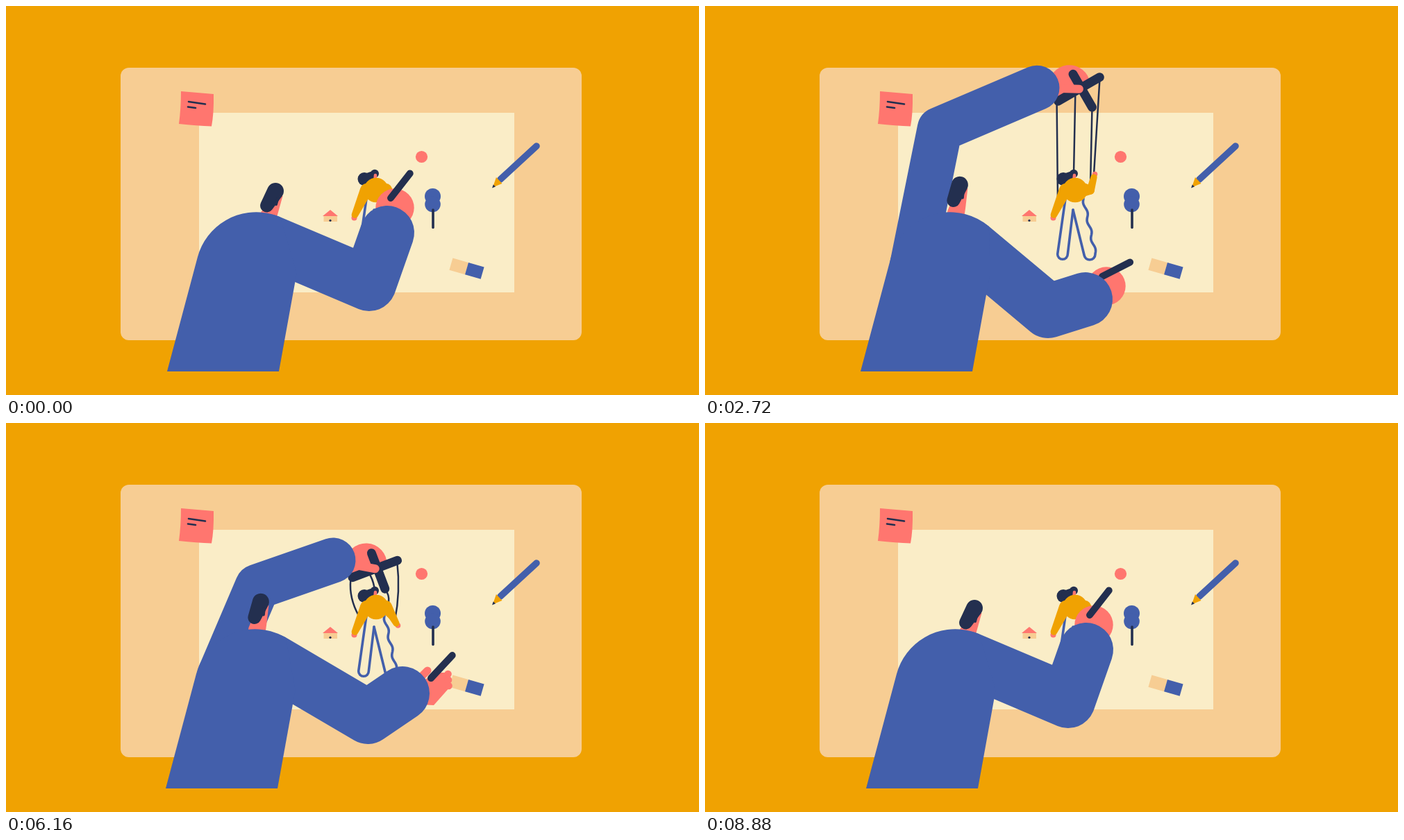
An HTML page with a canvas that plays this animation: 998x561 px, repeating every 8.96 s.

```html
<!DOCTYPE html>
<html lang="en">
<head>
<meta charset="utf-8">
<title>The illustrator</title>
<style>
  html, body { margin: 0; width: 100%; height: 100%; overflow: hidden; background: #f0a202; }
  canvas { display: block; width: 100vw; height: 100vh; }
</style>
</head>
<body>
<canvas id="stage"></canvas>
<script>
const W = 998, H = 561, LOOP = 8960, STEP = 80, TAU = Math.PI * 2;
const ORANGE = '#f0a202', SAND = '#f7cd93', PAPER = '#faedc7';
const BLUE = '#435fab', DARK = '#232f4f', PINK = '#ff766f';

const canvas = document.getElementById('stage');
const c = canvas.getContext('2d');

const clamp = u => Math.min(1, Math.max(0, u));
const mix = (a, b, k) => a + (b - a) * k;
const ramp = (t, from, to) => clamp((t - from) / (to - from));
const ease = (t, from, to) => { const u = ramp(t, from, to); return u * u * (3 - 2 * u); };
const rad = deg => deg * Math.PI / 180;

// Right arm: elbow, wrist, hand, pen angle, body lean.
const top_ = [523, 401, 549, 327, 560, 291, -52, 0];
const low = [511, 436, 541, 386, 553, 351, -62, 0];
const rest = [494, 440, 548, 423, 578, 404, -27, -8];
const reach = [521, 424, 571, 390, 618, 382, -47, -2];
const desk = [545, 418, 618, 390, 655, 378, -20, 0];
const rub = [529, 380, 553, 336, 565, 301, -52, 0];
const rightMoves = [
  [0, top_], [1040, low], [1240, low], [1640, top_], [2000, rest], [5640, rest],
  [6160, reach], [6480, desk], [6720, desk], [7040, low], [7600, rub], [7720, rub],
  [8000, desk], [8320, desk], [8880, top_]
];

// Left arm: elbow, wrist.
const hidden = [300, 400, 290, 450];
const aside = [228, 330, 300, 270];
const raisedUp = [338, 178, 478, 117];
const lowered = [362, 236, 471, 198];
const leftMoves = [
  [1960, hidden], [2120, aside], [2440, raisedUp], [5760, raisedUp], [6160, lowered], [6560, hidden]
];

function pose(moves, t) {
  const next = moves.findIndex(([time]) => time > t);
  if (next < 0) return moves[moves.length - 1][1];
  if (next === 0) return moves[0][1];
  const [t0, from] = moves[next - 1], [t1, to] = moves[next], k = ease(t, t0, t1);
  return from.map((v, i) => mix(v, to[i], k));
}

function fill(color) { c.fillStyle = color; c.fill(); }
function disc(x, y, r, color) {
  c.beginPath();
  c.arc(x, y, r, 0, TAU);
  fill(color);
}
function trace(points) {
  c.beginPath();
  for (let i = 0; i < points.length; i += 2) c.lineTo(points[i], points[i + 1]);
}
function poly(color, ...points) {
  trace(points);
  fill(color);
}
function line(color, width, ...points) {
  trace(points);
  c.strokeStyle = color;
  c.lineWidth = width;
  c.stroke();
}
function box(x, y, w, h, r, color) {
  c.beginPath();
  c.roundRect(x, y, w, h, r);
  fill(color);
}
// Tapered limb: the hull of two circles.
function limb(color, x1, y1, r1, x2, y2, r2) {
  const a = Math.atan2(y2 - y1, x2 - x1);
  const b = Math.acos((r1 - r2) / Math.hypot(x2 - x1, y2 - y1));
  c.beginPath();
  c.arc(x1, y1, r1, a + b, a - b + TAU);
  c.arc(x2, y2, r2, a - b, a + b);
  fill(color);
}
function within(x, y, deg, draw) {
  c.save();
  c.translate(x, y);
  c.rotate(rad(deg));
  draw();
  c.restore();
}

function drawDesk(eraserOnDesk) {
  box(0, 0, W, H, 0, ORANGE);
  box(165, 89, 664, 393, 12, SAND);
  box(278, 154, 454, 259, 0, PAPER);

  c.beginPath();
  c.moveTo(252, 123);
  c.lineTo(299, 127);
  c.quadraticCurveTo(299.5, 155, 296, 173.5);
  c.quadraticCurveTo(275, 172.5, 249, 170);
  c.quadraticCurveTo(252, 148, 252, 123);
  fill(PINK);
  line(DARK, 2.6, 263, 138, 287, 141.5);
  line(DARK, 2.6, 262, 145.5, 273, 147);

  box(457.5, 302, 19.5, 9, 0, SAND);
  poly(PINK, 456, 303, 467, 294, 478, 303);
  disc(467, 309.3, 1.6, DARK);

  disc(598.5, 217.5, 8.6, PINK);
  disc(614.5, 274.5, 11.5, BLUE);
  disc(614.5, 286, 11.3, BLUE);
  line(DARK, 3.6, 615, 294, 615, 319.5);

  line(BLUE, 9.6, 764, 202, 712, 250);
  poly(ORANGE, 706, 247, 714.5, 256, 701, 261.5);
  poly(DARK, 701.8, 257.5, 705, 260.5, 700, 262.5);

  if (eraserOnDesk) within(663.5, 378.7, 16, () => {
    box(-23.5, -9, 23.5, 18, 0, SAND);
    box(0, -9, 23.5, 18, 0, BLUE);
  });
}

function drawLegs(t) {
  c.strokeStyle = BLUE;
  c.lineWidth = 3.6;
  c.beginPath();
  c.moveTo(519, 278);
  c.lineTo(507.8, 357);
  c.arc(515, 358, 7.3, Math.PI, 0, true);
  c.lineTo(530, 294);
  c.stroke();

  // The right leg is drawn along its outline and rubbed out from the foot up.
  const drawn = 0.4 * ramp(t, 0, 1040) + 0.6 * ramp(t, 1040, 1600);
  const bottom = mix(372, 270, ramp(t, 6960, 7890));
  c.save();
  c.beginPath();
  c.rect(500, 270, 90, bottom - 270);
  c.clip();
  c.beginPath();
  for (let u = 0; u <= 1.001; u += 0.025)
    c.lineTo(545 + 17 * u - 1.8 * Math.sin(u * TAU * 3), 278 + 79 * u);
  c.arc(554, 358, 8, 0, Math.PI * 0.93);
  c.lineTo(530, 294);
  if (drawn < 1) c.setLineDash([drawn * 180, 999]);
  c.stroke();
  c.restore();
}

function drawStrings(x, y, tilt, sway, wave) {
  const cos = Math.cos(rad(tilt)), sin = Math.sin(rad(tilt));
  const slack = Math.max(0, y - 127) * 0.1;
  const string = (along, down, endX, endY, bulge) => {
    const sx = x + along * cos - down * sin, sy = y + along * sin + down * cos;
    c.beginPath();
    c.moveTo(sx, sy);
    c.quadraticCurveTo((sx + endX) / 2 + bulge * slack, (sy + endY) / 2, endX, endY);
    c.strokeStyle = DARK;
    c.lineWidth = 2.5;
    c.stroke();
  };
  string(-42, 3, 508, 278, -1);
  string(-13, 6, 531 + sway * 2, 242, 0.3);
  string(0, 32, mix(551, 555, wave), 258, 0.5);
  string(30, 2, 560, mix(285, 243, wave), 0.8);
}

function drawDoll(sway, wave) {
  const hx = sway * 1.7;
  disc(516 + hx, 249.5, 9.5, DARK);
  line(DARK, 11, 519 + hx, 247, 529 + hx, 243.5);
  disc(531 + hx, 241.8, 6, DARK);
  line(PINK, 4.5, 532 + hx, 244, 531.5 + hx, 250);

  const elbow = [mix(556, 555, wave), mix(278, 266, wave), 5.8];
  const wrist = [mix(562, 560, wave), mix(289, 247, wave), 4.6];
  disc(501.5, 305.5, 4, PINK);
  disc(mix(564.5, 561.5, wave), mix(292, 242.5, wave), 3.8, PINK);
  limb(ORANGE, 519 + sway, 265, 9, 502.5, 301, 4.8);
  limb(ORANGE, 547 + sway, 265, 9, ...elbow);
  limb(ORANGE, ...elbow, ...wrist);
  disc(533 + sway, 265.5, 17.8, ORANGE);
}

function drawControl(x, y, tilt) {
  within(x, y, tilt, () => {
    const edge = Math.asin(11 / 30);
    c.beginPath();
    c.arc(-13, -11, 30, Math.PI - edge, edge);
    fill(PINK);
    line(DARK, 13, -38, 0, 31, 0);
    line(DARK, 13, 0, -23, 0, 32);
    line(PINK, 12, -26, -14, -3, 0);
  });
}

function drawHead(x, y, tilt) {
  within(x, y, tilt, () => {
    poly(PINK, 6, -28, 20.5, -25, 13, 2, 8, 18, -18, 18, -13, 2, -8, -6);
    limb(DARK, 10, -32, 12, -2.5, -11, 9.5);
    line(DARK, 4, 13.5, -22, 11, -13);
  });
}

function drawHand(x, y, open) {
  if (!open) return disc(x, y, 27.7, PINK);
  within(x, y, 0, () => {
    poly(PINK, -18, -10, 2, -22, 18, -22, 22, -2, -2, 25, -22, 24);
    line(PINK, 11, -22, -14, -11, -25);
    for (let i = 0; i < 3; i++) disc(18.5 + i * 0.5, -20 + i * 8.5, 5.3, PINK);
  });
}

// Angle at which a line from (ex, ey) touches a circle around the body centre.
function touch(cx, cy, r, ex, ey) {
  const reachAngle = Math.acos(Math.min(1, r / Math.hypot(ex - cx, ey - cy)));
  return Math.atan2(ey - cy, ex - cx) - reachAngle;
}
function drawArm(cx, cy, bodyR, width, [ex, ey, wx, wy]) {
  const r = bodyR - width / 2, a = touch(cx, cy, r, ex, ey);
  line(BLUE, width, cx + r * Math.cos(a), cy + r * Math.sin(a), ex, ey, wx, wy);
  return a;
}

function render(t) {
  const right = pose(rightMoves, t), left = pose(leftMoves, t);
  const [, , , , , , penAngle, lean] = right;
  const rubbing = 10 * Math.sin(ramp(t, 7040, 7600) * TAU * 2);
  right[3] += rubbing;
  right[5] += rubbing;
  const [hx, hy] = right.slice(4);
  const cx = 360.5 + lean, cy = 384.8, bodyR = 87.6;

  // The control bar rocks, and the doll waves with it.
  const up = ease(t, 2000, 2440) - ease(t, 5760, 6160);
  const rock = Math.cos((t - 2720) / 960 * TAU);
  const wave = up * (1 + rock) / 2, sway = up * 1.5 * (1 - rock);
  left[3] += rock * up * 1.2;
  const bar = [left[2] + 63.5, left[3] + 6 - 6 * rock, -25 - 5 * rock];

  // The pen goes from the hand to the paper and back.
  const laid = ease(t, 6160, 6400) - ease(t, 8240, 8560);
  const px = hx - 6, py = hy - 14;
  const tipX = px + 45 * Math.cos(rad(penAngle)), tipY = py + 45 * Math.sin(rad(penAngle));
  const drawPen = () => line(DARK, 10 - laid, mix(px, 613, laid), mix(py, 332, laid),
    mix(tipX, 682, laid), mix(tipY, 335, laid));

  const look = ease(t, 1640, 2000) - ease(t, 6160, 6640);
  const open = (t > 5960 && t < 6720) || (t > 7920 && t < 8400);

  drawDesk(t < 6640 || t >= 8000);
  if (t >= 2280 && t < 6400) drawStrings(...bar, sway, wave);
  drawLegs(t);
  drawDoll(sway, wave);
  if (laid === 1) drawPen();
  if (t > 1960 && t < 6560) {
    drawControl(...bar);
    drawArm(cx, cy, bodyR, 65, left);
  }
  drawHead(mix(378, 362, look), mix(299, 291, look), -9 * look);
  drawHand(hx, hy, open);
  if (laid < 1) drawPen();

  const shoulder = drawArm(cx, cy, bodyR, 78, right);
  c.beginPath();
  c.moveTo(232 + lean, 527);
  c.arc(cx, cy, bodyR, -2.88, shoulder);
  c.lineTo(418.7 + lean, 385);
  c.lineTo(393 + lean, 527);
  fill(BLUE);
}

const start = performance.now();
function frame() {
  const dpr = window.devicePixelRatio || 1;
  const w = Math.round(innerWidth * dpr), h = Math.round(innerHeight * dpr);
  if (canvas.width !== w || canvas.height !== h) {
    canvas.width = w;
    canvas.height = h;
  }
  c.setTransform(w / W, 0, 0, h / H, 0, 0);
  c.lineCap = c.lineJoin = 'round';
  const t = (performance.now() - start) % LOOP;
  render(Math.floor(t / STEP) * STEP);
  requestAnimationFrame(frame);
}
frame();
</script>
</body>
</html>
```
